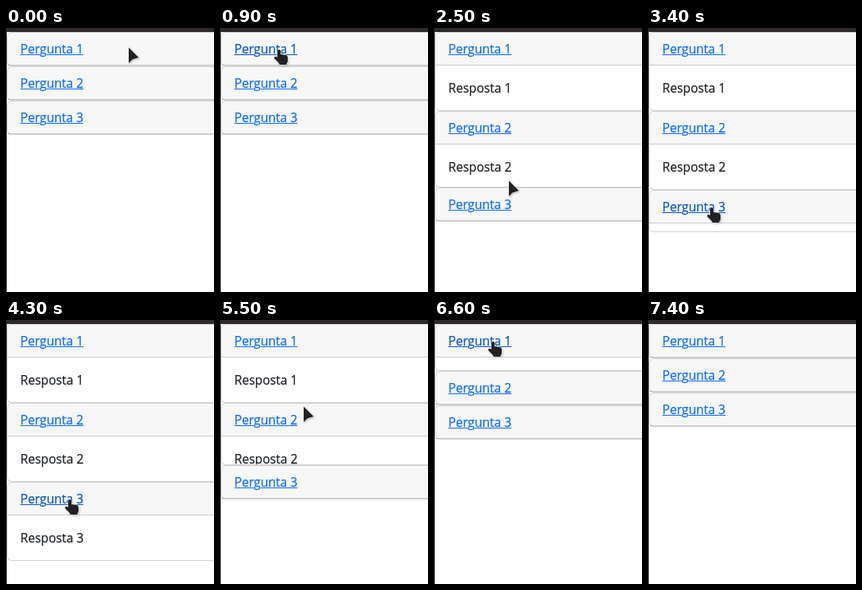
An HTML page for the animation above (8200 ms loop, 261 by 331 pixels).

```html
<!DOCTYPE html>
<html lang="pt">
<head>
<meta charset="utf-8">
<style>
* { box-sizing: border-box; }
html, body { margin: 0; width: 100%; height: 100%; overflow: hidden; background: #fff; }
body { position: relative; font: 15.6px/24px "Open Sans", "Noto Sans", sans-serif; color: #212529;
  -webkit-text-stroke: .25px; }
.frame { position: absolute; inset: 0; border: solid #2e2a2b; border-width: 5px 0 0 1px; overflow: hidden; }
.card { width: 300px; border: 1px solid rgba(0,0,0,.175); border-radius: 6px; background: #fff; }
.head { height: 41px; padding: 8px 16px; background: rgba(0,0,0,.03);
  border-bottom: 1px solid rgba(0,0,0,.175); border-radius: 5px 5px 0 0; }
.link { color: #0d6efd; text-decoration: underline 1px; text-underline-offset: 1px; }
.link.hover { color: #0a58ca; }
.body { overflow: hidden; }
.body div { padding: 16px; height: 56px; }
svg { position: absolute; left: 0; top: 0; overflow: visible; filter: drop-shadow(1px 1px 1px rgba(0,0,0,.25)); }
path { fill: #222; stroke: #fff; paint-order: stroke; stroke-linejoin: round; }
</style>
</head>
<body>
<div class="frame" id="list"></div>
<svg id="cursor" width="20" height="26">
  <path id="arrow" d="M1 1.5V21L5.5 16.5L13.5 14Z"/>
  <path id="hand" d="M-3 2Q-3 0-1 0T1 2V6L8 7Q10 8 10 10V15L8 19H0L-2 16L-7 11Q-7 8-4 9L-3 10Z"/>
</svg>
<script>
const LOOP = 8200, STEP = 100, SLIDE = 350, FULL = 56;
const $ = id => document.getElementById(id);
const lerp = (a, b, p) => Math.round(a + (b - a) * p);

// where the pointer rests on the link of an open list
const link = i => [75 + 3 * i, 27 + 99 * i];

// pointer moves: start, end, evenly timed stops
const moves = [
  [400, 900, link(0)],
  [1300, 2100, [98, 100], link(1)],
  [2200, 3100, [93, 190], [90, 247], link(2)],
  [3800, 4300, [130, 277], link(2)],
  [4700, 5200, link(1)],
  [5400, 5500, [104, 107]],
  [5500, 5900, link(0)],
  [7000, 7400, [200, -30]]
];

const opens = [1350, 2245, 3350], closes = [6450, 5418, 4550];

const cards = opens.map((open, i) => {
  const el = document.createElement("div");
  el.className = "card";
  el.innerHTML = `<div class="head"><span class="link">Pergunta ${i + 1}</span></div>
    <div class="body"><div>Resposta ${i + 1}</div></div>`;
  $("list").append(el);
  return { open, close: closes[i], link: el.querySelector(".link"), body: el.querySelector(".body") };
});

// CSS "ease": cubic-bezier(.25, .1, .25, 1)
function ease(p) {
  if (p <= 0) return 0;
  if (p >= 1) return 1;
  let lo = 0, hi = 1, s;
  for (let i = 0; i < 20; i++) {
    s = (lo + hi) / 2;
    const x = .75 * s * (1 - s) + s ** 3;
    if (x < p) lo = s; else hi = s;
  }
  return .3 * s * (1 - s) ** 2 + 3 * s * s * (1 - s) + s ** 3;
}

function cursorAt(t) {
  let pos = [153, 23];
  for (const [start, end, ...stops] of moves) {
    const leg = (end - start) / stops.length;
    stops.forEach((stop, i) => {
      const p = Math.min(1, Math.max(0, (t - start) / leg - i));
      pos = pos.map((v, axis) => lerp(v, stop[axis], p));
    });
  }
  return pos;
}

function draw(now) {
  const t = Math.floor(now % LOOP / STEP) * STEP;
  const [x, y] = cursorAt(t);
  let top = 5, over = false;
  for (const c of cards) {
    const h = Math.round(FULL * (ease((t - c.open) / SLIDE) - ease((t - c.close) / SLIDE)));
    const hit = x >= 18 && x <= 97 && y >= top + 9 && y <= top + 33;
    c.body.style.height = h + "px";
    c.link.classList.toggle("hover", hit);
    over = over || hit;
    top += 43 + h;
  }
  $("cursor").style.transform = `translate(${x}px, ${y}px)`;
  $("arrow").style.display = over ? "none" : "";
  $("hand").style.display = over ? "" : "none";
}

let start;
function tick(now) {
  start ??= now;
  draw(now - start);
  requestAnimationFrame(tick);
}
draw(0);
requestAnimationFrame(tick);
</script>
</body>
</html>
```
